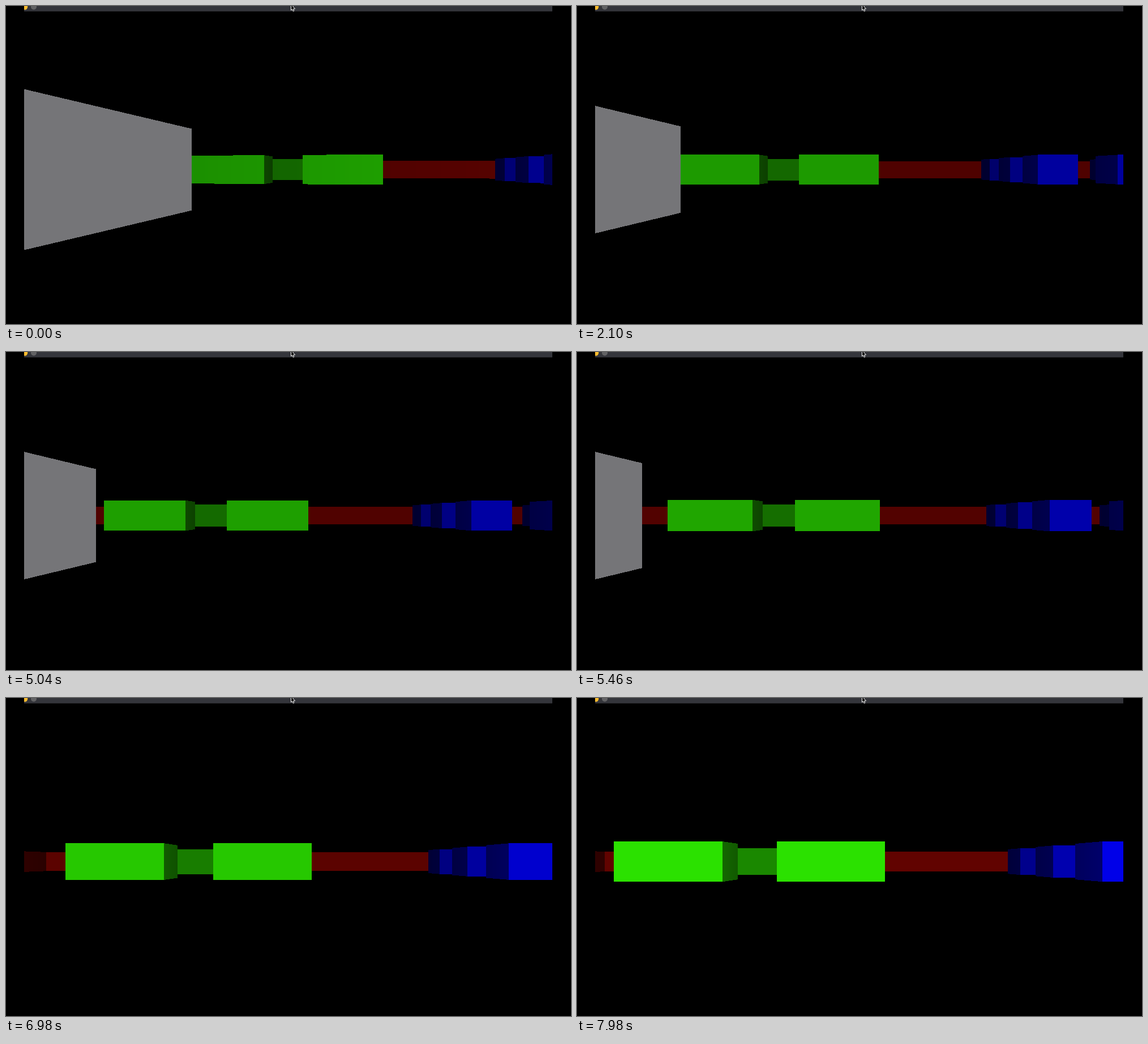
Write an HTML page with a canvas that moves like this. It is 998x561 px and loops after 8000 ms.

```html
<!DOCTYPE html>
<html lang="en">
<head>
<meta charset="utf-8">
<title>Raycaster</title>
<style>
  html, body { margin: 0; width: 100%; height: 100%; overflow: hidden; background: #000; }
  canvas { display: block; width: 998px; height: 561px; }
</style>
</head>
<body>
<canvas id="view" width="998" height="561"></canvas>
<script>
const ctx = document.getElementById('view').getContext('2d');
const LOOP = 8000, LEFT = 32, RIGHT = 965;
const MID_X = 501.1, MID_Y = 288.6, FOCAL = 749, WALL = 556;
const START_X = 19.65, POS_Y = 10.548;
const TURN = 10 * Math.PI / 180, TURN_END = 960;

// Forward steps: start time, count, distance per step
const STEP_MS = 140;
const MOVES = [
  [4040, 1, 0.13],
  [5040, 4, 0.13],
  [5580, 5, 0.118],
  [6280, 6, 0.1333],
  [7120, 7, 0.1143]
];

const TINT = {
  red: [1.02, 0.03, 0],
  green: [0.19, 1, 0],
  blue: [0, 0, 1.03],
  white: [1, 1, 1.02]
};

const inside = (v, a, b) => v >= a && v <= b;
const clamp = (v, a, b) => Math.max(a, Math.min(b, v));

function cell(x, y) {
  if (x <= 0 || y <= 0 || x >= 23 || y >= 23) return 'red';
  if (inside(x, 16, 21) && inside(y, 1, 8)) return 'white';
  if (inside(x, 4, 8) && inside(y, 6, 10)) {
    const rim = x === 4 || x === 8 || y === 6 || y === 10;
    return rim && !(x === 8 && y === 8) ? 'green' : null;
  }
  const pillar = inside(x, 4, 8) && x % 2 === 0 && inside(y, 15, 19) && y % 2 === 1;
  return pillar && !(x === 6 && y === 17) ? 'blue' : null;
}

function cast(px, py, dx, dy) {
  let x = Math.floor(px), y = Math.floor(py);
  const stepX = Math.sign(dx), stepY = Math.sign(dy);
  const lenX = Math.abs(1 / dx), lenY = Math.abs(1 / dy);
  let nextX = (dx < 0 ? px - x : x + 1 - px) * lenX;
  let nextY = (dy < 0 ? py - y : y + 1 - py) * lenY;
  for (;;) {
    const side = nextY <= nextX;
    const dist = side ? nextY : nextX;
    if (side) { y += stepY; nextY += lenY; }
    else { x += stepX; nextX += lenX; }
    const kind = cell(x, y);
    if (kind) return { kind, side, dist };
  }
}

function shade({ kind, side, dist }) {
  const light = Math.min(255, 225 * Math.pow(7.81 / dist, 1.226)) * (side ? 0.46 : 1);
  return `rgb(${TINT[kind].map(c => Math.round(Math.min(255, c * light))).join()})`;
}

function drawWalls(t) {
  const posX = MOVES.reduce((x, [from, count, size]) =>
    x - size * clamp(Math.floor((t - from) / STEP_MS) + 1, 0, count), START_X);
  const angle = t < TURN_END ? TURN : 0;
  const c = Math.cos(angle), s = Math.sin(angle);
  for (let x = LEFT; x < RIGHT; x++) {
    const k = (x + 0.5 - MID_X) / FOCAL;
    const hit = cast(posX, POS_Y, -c - s * k, -s + c * k);
    const half = WALL / hit.dist / 2;
    const top = Math.round(MID_Y - half);
    ctx.fillStyle = shade(hit);
    ctx.fillRect(x, top, 1, Math.round(MID_Y + half) - top);
  }
}

function dot(x, y, r, color) {
  ctx.fillStyle = color;
  ctx.beginPath();
  ctx.arc(x, y, r, 0, Math.PI * 2);
  ctx.fill();
}

function drawBar() {
  ctx.save();
  ctx.beginPath();
  ctx.rect(LEFT, 0, RIGHT - LEFT, 9.5);
  ctx.clip();
  ctx.fillStyle = '#34353b';
  ctx.fillRect(LEFT, 0, RIGHT - LEFT, 10);
  dot(33, 1.5, 5.2, '#fdbc2e');
  dot(49, 1.5, 5, '#626264');
  ctx.restore();
}

function drawPointer() {
  ctx.beginPath();
  [[503.5, -3], [503.5, 7.5], [505.5, 5.8], [507.3, 9.3], [508.8, 8.6], [507.2, 5.2], [510.5, 5]]
    .forEach(([x, y]) => ctx.lineTo(x, y));
  ctx.closePath();
  ctx.fillStyle = '#000';
  ctx.fill();
  ctx.strokeStyle = '#fff';
  ctx.lineWidth = 1;
  ctx.stroke();
}

function frame() {
  ctx.fillStyle = '#000';
  ctx.fillRect(0, 0, 998, 561);
  drawWalls(performance.now() % LOOP);
  drawBar();
  drawPointer();
  requestAnimationFrame(frame);
}
frame();
</script>
</body>
</html>
```
